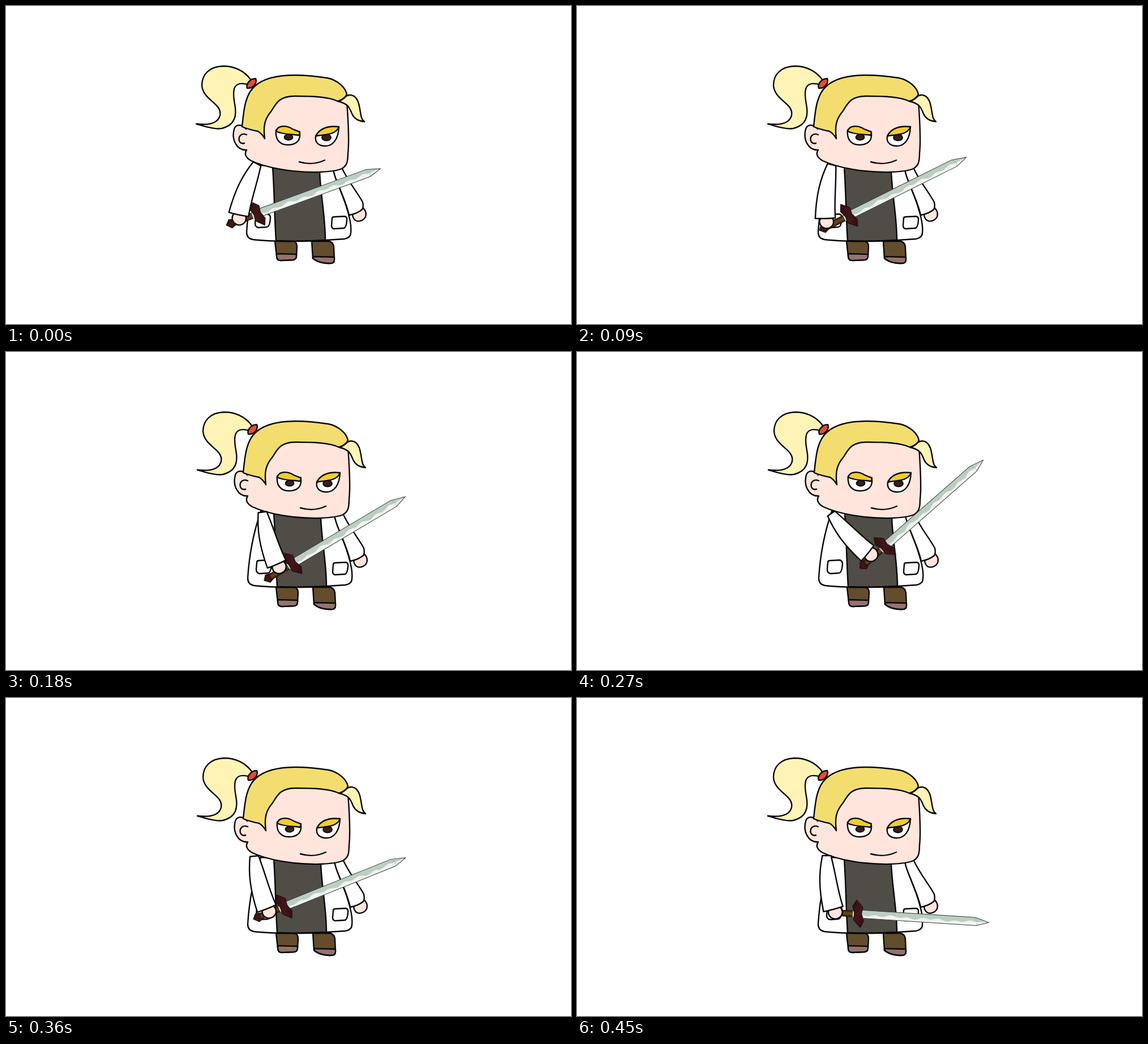
Recreate the animation shown at these times as an HTML page. Size 998 by 561 pixels, loop 0.48 s.

```html
<!DOCTYPE html>
<html lang="en">
<head>
<meta charset="utf-8">
<title>Sword swing</title>
<style>
  html, body { margin: 0; width: 100%; height: 100%; overflow: hidden; background: #fff; }
  svg { display: block; width: 100%; height: 100%; }
</style>
</head>
<body>
<svg viewBox="0 0 998 561" fill="none" stroke="#060606" stroke-width="2.4" stroke-linecap="round" stroke-linejoin="round">
  <defs>
    <linearGradient id="wood" x1="0" y1="0" x2="0" y2="1">
      <stop offset="0" stop-color="#38200d"/>
      <stop offset=".5" stop-color="#6b4a1d"/>
      <stop offset="1" stop-color="#351d0c"/>
    </linearGradient>
    <linearGradient id="metal" x1="0" y1="0" x2="1" y2="1">
      <stop offset="0" stop-color="#2b0c0e"/>
      <stop offset=".5" stop-color="#43171a"/>
      <stop offset="1" stop-color="#2e0d0f"/>
    </linearGradient>
  </defs>

  <g id="body">
    <!-- legs -->
    <g fill="#644d2c">
      <path d="M475 415L478 441Q478 449 485 449L507 448Q513 447 513 441L514 425Q514 417 508 415Z"/>
      <path d="M540 415L542 445Q552 454 573 454Q580 454 580 447L579 425Q578 417 571 415Z"/>
    </g>
    <g fill="#95736f">
      <path d="M478 437L513 438V441Q513 447 507 448L485 449Q478 449 478 441Z"/>
      <path d="M542 442L580 443V447Q580 454 573 454Q552 454 542 445Z"/>
    </g>

    <!-- coat and shirt -->
    <path fill="#fff" d="M448 281C437 313 428 350 425 399Q425 410 436 412C470 416 530 416 566 413L597 411Q609 409 609 400Q611 385 602 357C596 335 586 318 578 289Z"/>
    <path fill="#504c46" d="M471 285C474 325 474 370 477 414Q520 416 564 413C564 370 555 330 554 290Z"/>
    <path d="M444 368L462 367Q467 368 467 374Q466 390 460 390L446 391Q440 390 440 383L441 372Q441 368 444 368Z"/>
    <path d="M579 372L598 371Q603 372 602 378Q601 392 596 392L579 393Q575 392 575 387L576 375Q576 372 579 372Z"/>

    <!-- far arm -->
    <path fill="#ffe5dc" d="M612 367C613 384 630 382 635 372C638 363 632 356 627 354Z"/>
    <path fill="#fff" d="M578 288C581 305 587 314 590 323C596 338 603 354 606 369Q621 366 629 359Q632 355 630 346C621 329 605 311 593 285Z"/>

    <!-- ponytail -->
    <path fill="#fff4b5" d="M433 131C420 112 400 106 383 106C359 107 346 121 346 140C348 167 382 171 378 193C374 209 353 210 336 208C354 213 369 218 381 216C405 210 408 193 404 173C399 146 402 131 429 139Z"/>

    <!-- head -->
    <path fill="#ffe5dc" d="M424 217C417 208 406 208 403 217C398 235 407 255 425 254C420 261 424 268 433 273C458 285 505 294 553 293Q581 292 593 287C602 282 604 275 604 260C607 233 604 195 602 168C585 140 470 140 440 170Z"/>
    <path d="M425 227C415 223 410 231 412 238Q415 244 421 242"/>
    <path fill="#f3dd6f" d="M417 213C420 184 422 156 440 141C457 126 483 122 510 122C537 122 555 125 568 127C586 131 600 144 602 156Q598 164 586 168C570 160 540 159 510 159C484 159 478 170 469 185C457 199 454 211 457 234Q452 225 445 221Q429 218 417 213Z"/>
    <path fill="#fff4b5" d="M586 168Q594 167 601 159C610 154 618 159 622 169C627 183 625 199 633 204C622 203 615 199 611 190C606 177 603 172 586 168Z"/>
    <path fill="#e64a34" d="M426 145C423 138 431 128 441 128C444 134 438 146 426 145Z"/>

    <!-- face -->
    <path fill="#fff" d="M477 219C475 238 486 245 498 245C512 245 520 238 519 225Z"/>
    <path fill="#fff" d="M547 230C545 242 554 247 564 247C577 247 587 236 588 213Z"/>
    <g fill="#3a1e1b" stroke-width="1.8">
      <ellipse cx="499" cy="231.5" rx="7.5" ry="5"/>
      <ellipse cx="566" cy="232" rx="8" ry="5.5"/>
    </g>
    <g fill="#efcd33">
      <path d="M477 221C480 210 495 210 506 217Q513 220 519 222Q519 226 517 228C505 226 489 227 477 221Z"/>
      <path d="M547 229C555 215 570 211 588 213C584 226 567 227 547 229Z"/>
    </g>
    <path d="M518 275Q541 282 563 272"/>
  </g>

  <g id="sword" stroke="#1d0c0d" stroke-width="1">
    <path id="pommel" fill="url(#metal)" d="M-67 0L-60 -7.5L-50 -5V5L-59 8.5Z"/>
    <path fill="url(#wood)" d="M-54 -5H-17V5.5H-54Z"/>
    <path stroke="#e9e4d8" stroke-width="2" d="M-17 -4V5"/>
    <path fill="#bccdc2" stroke="none" d="M-4 -7.3H198L223 0L201 7H0Z"/>
    <path id="shine" fill="#f0f5f1" stroke="none"/>
    <path stroke="#343b37" d="M-4 -7.3H198L223 0L201 7H0"/>
    <path stroke="#8a9a91" stroke-width=".6" d="M198 -7L203 0L201 7"/>
    <path fill="url(#metal)" d="M-12.7 -24.5L-19 -13L-15 -.5L-16 11L-3 23.8L2 12L-2.5 0L-.8 -12.5Z"/>
  </g>

  <g id="arm">
    <ellipse cx="3" cy="101" rx="12.3" ry="11.8" fill="#ffe5dc"/>
    <path fill="#fff" d="M-7.5 -1C-17 27 -21 55 -17.5 97.5Q2 96 17.5 92.5C12 65 12 35 7.5 1Z"/>
  </g>
</svg>
<script>
  const STEP = 90, LOOP = 480;

  // body shift, then x, y and angle of the arm and of the sword
  const poses = [
    { shift: 0, arm: [443.5, 278.5, 20], sword: [452, 363.5, -20.1] },
    { shift: 1, arm: [450, 280, 6.9], sword: [488, 366, -26.4] },
    { shift: 2, arm: [453, 282.5, -15.3], sword: [513.5, 369, -30.7] },
    { shift: 2, arm: [449, 285, -42.5], sword: [550, 337.5, -41.2] },
    { shift: 2, arm: [438.5, 279, -13.4], sword: [499, 365, -21.9] },
    { shift: 1, arm: [441, 278, -7], sword: [505, 381.5, 3.7], hidePommel: true }
  ];

  const part = id => document.getElementById(id);
  const [body, sword, arm, pommel] = ['body', 'sword', 'arm', 'pommel'].map(part);

  // wavy light band along the lower edge of the blade
  let band = 'M0 7';
  for (let x = 0; x <= 198; x += 3) {
    const y = 1.2 + 1.5 * Math.sin(x / 4.5) + Math.sin(x / 11);
    band += `L${x} ${y.toFixed(1)}`;
  }
  part('shine').setAttribute('d', band + 'L221 0L201 7Z');

  const place = (el, [x, y, angle]) =>
    el.setAttribute('transform', `translate(${x} ${y}) rotate(${angle})`);

  function draw(time) {
    const pose = poses[Math.floor((time % LOOP) / STEP)];
    place(body, [pose.shift, 0, 0]);
    place(arm, pose.arm);
    place(sword, pose.sword);
    pommel.style.display = pose.hidePommel ? 'none' : '';
  }

  let start;
  function tick(now) {
    start ??= now;
    draw(now - start);
    requestAnimationFrame(tick);
  }
  draw(0);
  requestAnimationFrame(tick);
</script>
</body>
</html>
```
